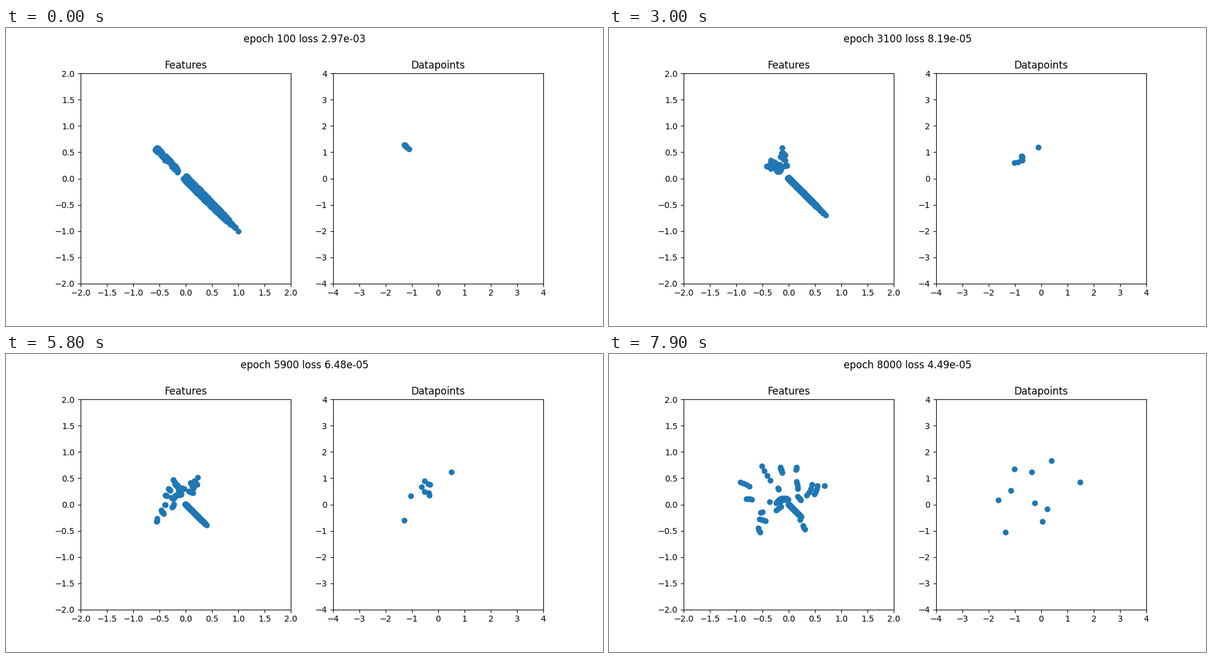
A matplotlib script for the animation above (8000 ms loop, 1000 by 500 pixels).

```python
import numpy as np
import matplotlib.pyplot as plt
from matplotlib.animation import FuncAnimation

FRAMES, INTERVAL = 80, 100
rng = np.random.default_rng(4)
DIAG = np.array([1, -1])


def smooth(t, times, keys):
    """Cubic Hermite path through the keys (first axis is time)."""
    times = np.asarray(times, float)
    slope = np.gradient(keys, times, axis=0)
    i = int(np.clip(np.searchsorted(times, t, "right") - 1, 0, len(times) - 2))
    h = times[i + 1] - times[i]
    u = (t - times[i]) / h
    return ((1 + 2 * u) * (1 - u) ** 2 * keys[i] + u * (1 - u) ** 2 * h * slope[i]
            + u * u * (3 - 2 * u) * keys[i + 1] + u * u * (u - 1) * h * slope[i + 1])


def tip(t):
    """Reach of the diagonal: a quick overshoot, then decay."""
    return (1.4 * np.exp(-t / 65) - .18) * (1 - .18 * np.exp(-t))


# Final rays of features: count, then angle and radius at both ends.
RAYS = [
    (1, 28, .773, 28, .773), (4, 33, .65, 22, .53), (4, 41, .58, 27, .38),
    (3, 218, .734, 224, .76), (4, 207, .62, 215, .54), (2, 196, .557, 196, .52),
    (4, 172, .81, 172, .71), (4, 155, 1.02, 155, .83), (4, 125, .9, 127, .58),
    (6, 103, .73, 102, .625), (3, 78, .725, 78, .675), (4, 71, .465, 61, .345),
    (2, 123, .37, 123, .35), (1, 172, .37, 172, .37), (4, 41, .23, 20, .24),
    (3, 205, .26, 195, .15), (12, 172, .24, 100, .1), (12, 165, .18, 110, .1),
]
end_angle = np.concatenate([np.linspace(a, b, n) for n, a, _, b, _ in RAYS])
end_radius = np.concatenate([np.linspace(p, q, n) for n, _, p, _, q in RAYS])
rank = np.linspace(0, 1, len(end_angle))
side = rng.uniform(-.025, .025, len(rank))

# The fan opens from the diagonal: where the final angles in FAN stand at
# a time, and how far the radius has gone from CORE to its final value.
FAN = [20, 78, 126, 155, 190, 221]
CORE = .28
OPENING = {
    30: ([98, 132, 135, 138, 146, 151], [.69, .3, .33, .25, .4, .42]),
    50: ([70, 123, 128, 133, 158, 195], [.6, .12, .2, .19, .2, .62]),
    58: ([59, 112, 117, 138, 174, 210], [.63, .17, .41, .22, .35, .76]),
    70: ([41, 93, 116, 144, 186, 219], [.7, .55, .74, .55, .65, .88]),
}
early = [0, 2, 5, 10, 16]
fan_times = early + list(OPENING) + [79]
polar = [(np.full(len(rank), 135.), tip(t) * (.8 - .6 * rank ** (2 - t / 16)))
         for t in early]
polar += [(np.interp(end_angle, FAN, a),
           CORE + (end_radius - CORE) * np.interp(end_angle, FAN, s))
          for a, s in OPENING.values()]
polar = np.array(polar + [(end_angle, end_radius)])


def fan(t):
    angle, radius = smooth(t, fan_times, polar)
    angle = np.radians(angle)
    spread = side * max(0, 1 - t / 40)
    return np.c_[radius * np.cos(angle) + spread, radius * np.sin(angle) + spread]


# The bulk stays on the diagonal and shrinks.
bulk_r = np.r_[1, rng.uniform(-.02, .76, 900), rng.uniform(.7, .97, 40)]
bulk_w = rng.uniform(-1, 1, len(bulk_r)) * (1 - bulk_r ** 4)


def bulk(t):
    width = .03 * np.exp(-t / 25)
    return np.outer(tip(t) * bulk_r, DIAG) + (width * bulk_w)[:, None]


def tail(t):
    """Four bulk features that break away late."""
    u = np.array([0, .6, .8, 1])[:, None]
    go = np.clip((t - 66) / 13, 0, 1)
    return ((1 - go) * (.18 + .12 * u) * DIAG
            + go * (np.array([.215, -.29]) + u * np.array([.09, -.185])))


# Datapoints: one tight cluster, then each heads for its own place.
mid = np.array([(.3, 1.28), (-1.29, -.31), (-.88, .38), (-.6, .74), (-.58, .74),
                (-.53, .71), (-.52, .71), (-.55, .58), (-.52, .53), (-.48, .49)])
late = np.array([(.92, 1.08), (-1.27, -.92), (-1.4, .26), (-.83, .55), (-.63, 1.23),
                 (-.12, .94), (-.04, 1.1), (-.43, .3), (-.11, .06), (-.06, .1)])
last = np.array([(1.48, .85), (-1.35, -1.06), (-1.63, .17), (-1.15, .53), (-1.02, 1.35),
                 (-.36, 1.23), (.4, 1.66), (-.24, .05), (.05, -.65), (.24, -.17)])
first = np.linspace((-1.29, 1.3), (-1.2, 1.19), 10)
first[0] = -1.1, 1.12
second = np.linspace((-.88, 1), (-.95, .89), 10)
pull = np.r_[.65, .3, .6, np.full(7, .5)][:, None]
points = np.array([first, second, second + pull * (mid - second), mid, late, last])


def loss(t):
    return np.exp(np.interp(t, [0, 2, 6, 16, 30, 50, 58, 70, 79], np.log(
        [2.97e-3, 3.5e-4, 1.02e-4, 9.27e-5, 8.19e-5, 7.22e-5, 6.48e-5,
         5.75e-5, 4.49e-5])))


fig, axes = plt.subplots(1, 2, figsize=(10, 5), dpi=100)
head = fig.suptitle("")
dots = []
for ax, name, lim in zip(axes, ("Features", "Datapoints"), (2, 4)):
    ax.set_title(name)
    ax.set(xlim=(-lim, lim), ylim=(-lim, lim), aspect="equal")
    dots.append(ax.scatter([], [], color="C0"))


def draw(t):
    dots[0].set_offsets(np.vstack([bulk(t), fan(t), tail(t)]))
    dots[1].set_offsets(smooth(t, [0, 16, 30, 50, 70, 79], points))
    head.set_text(f"epoch {100 * (t + 1)} loss {loss(t):.2e}")
    return (*dots, head)


anim = FuncAnimation(fig, draw, frames=FRAMES, interval=INTERVAL, repeat=True,
                     repeat_delay=0, init_func=lambda: draw(0))
plt.show()
```
